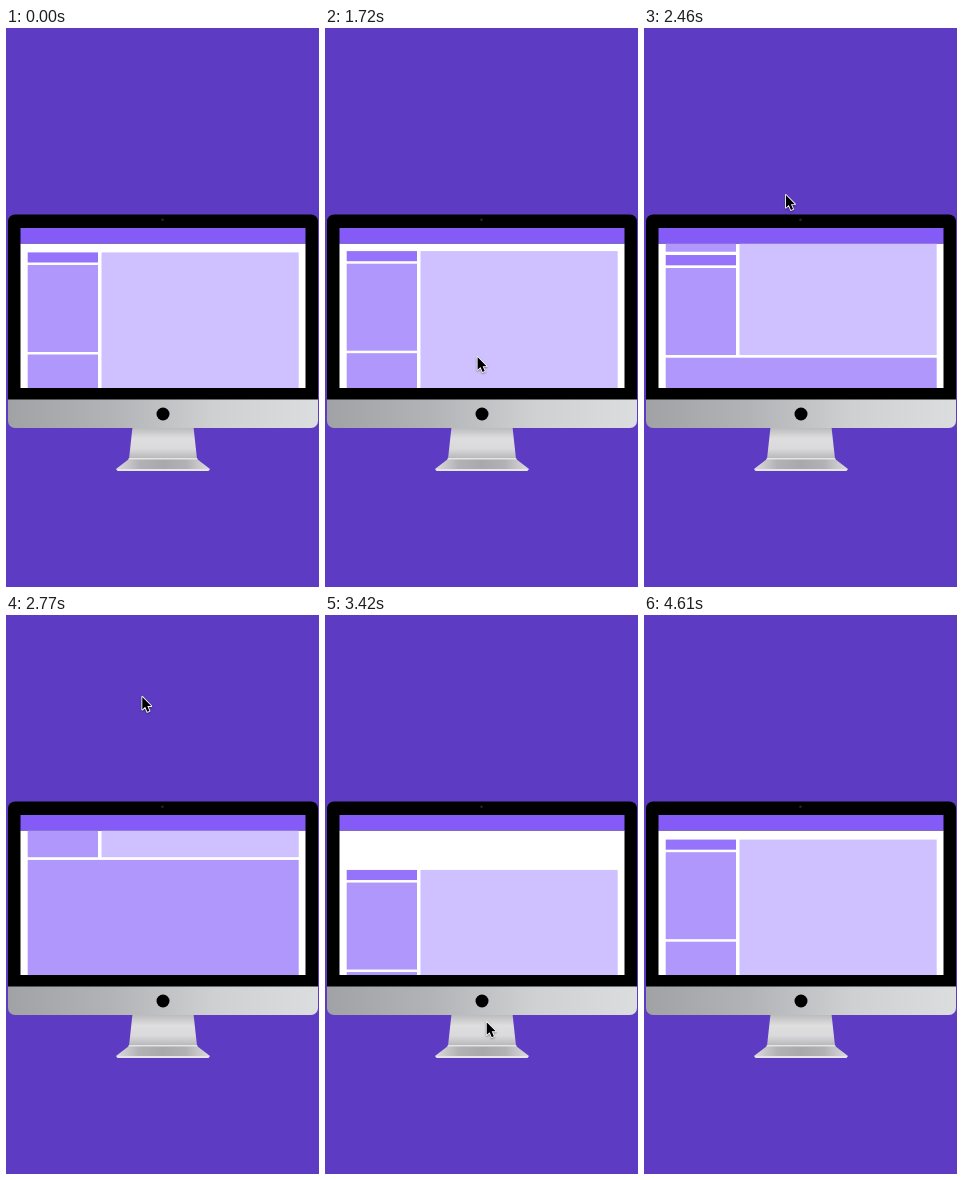
An HTML page with a canvas that plays this animation: 313x559 px, repeating every 4.76 s.

```html
<!DOCTYPE html>
<html lang="en">
<head>
<meta charset="utf-8">
<title>Dragging a page</title>
<style>
  html, body { margin: 0; width: 100%; height: 100%; overflow: hidden; background: #5d3cc3; }
  canvas { display: block; width: 313px; height: 559px; }
</style>
</head>
<body>
<canvas id="stage"></canvas>
<script>
const W = 313, H = 559, LOOP = 4760;
const POINTER_IN = 440, POINTER_OUT = 3850;
const GRAB_Y = 331, RELEASE = 3770;
const LAG = 16;        // ms the page trails the pointer
const STRETCH = 0.43;  // share of the drag followed past the top
const SETTLE = 160;    // time constant of the return, ms

const canvas = document.getElementById('stage');
const ctx = canvas.getContext('2d');
const ratio = window.devicePixelRatio || 1;
canvas.width = Math.round(W * ratio);
canvas.height = Math.round(H * ratio);
ctx.scale(ratio, ratio);

const easeOut = p => Math.sin(p * Math.PI / 2);
const easeInOut = p => (1 - Math.cos(p * Math.PI)) / 2;
const gather = p => p ** 1.23;

// Each stroke starts where the last one ended
const strokes = [
  { from: 440, to: 810, x: 134, y: 331, ease: easeOut },
  { from: 1200, to: 1360, x: 152, y: GRAB_Y, ease: easeInOut },
  { from: 1690, to: 2850, x: 134, y: 58, ease: gather },
  { from: 2870, to: 3540, x: 162, y: 420, ease: easeOut },
  { from: 3540, to: 3850, x: 162, y: 411, ease: easeInOut }
];

function pointerAt(t) {
  let x = 17, y = 364;
  for (const s of strokes) {
    const p = s.ease(Math.min(1, Math.max(0, (t - s.from) / (s.to - s.from))));
    x += (s.x - x) * p;
    y += (s.y - y) * p;
  }
  return { x, y };
}

function scrollAt(t) {
  if (t < strokes[2].from) return 0;
  const drag = pointerAt(Math.min(t, RELEASE) - LAG).y - GRAB_Y;
  const offset = drag > 0 ? drag * STRETCH : drag;
  return offset * Math.exp(-Math.max(0, t - RELEASE) / SETTLE);
}

function box(x0, y0, x1, y1, fill) {
  ctx.fillStyle = fill;
  ctx.fillRect(x0, y0, x1 - x0, y1 - y0);
}

// Symmetric trapezoid around the stand's axis
function trapezoid(y0, half0, y1, half1, fill) {
  const cx = 157;
  ctx.beginPath();
  ctx.moveTo(cx - half0, y0);
  ctx.lineTo(cx + half0, y0);
  ctx.lineTo(cx + half1, y1);
  ctx.lineTo(cx - half1, y1);
  ctx.fillStyle = fill;
  ctx.fill();
}

function disc(x, y, r, fill) {
  ctx.beginPath();
  ctx.arc(x, y, r, 0, Math.PI * 2);
  ctx.fillStyle = fill;
  ctx.fill();
}

// Evenly spaced colour stops
function gradient(x0, y0, x1, y1, ...colors) {
  const g = ctx.createLinearGradient(x0, y0, x1, y1);
  colors.forEach((c, i) => g.addColorStop(i / (colors.length - 1), c));
  return g;
}

function drawStand() {
  trapezoid(399, 30.5, 431, 34, gradient(0, 400, 0, 431, '#bcbcbf', '#dededf', '#dadadc', '#b6b6b8'));
  trapezoid(431, 34, 441, 47, gradient(110, 0, 204, 0, '#dcdcde', '#b2b2b4', '#a9a9ab', '#b2b2b4', '#dcdcde'));
  trapezoid(430, 34, 431.5, 35, '#e4e4e6');
  trapezoid(441, 47, 443, 45.5, '#e6e6e8');
}

function drawCase() {
  ctx.save();
  ctx.beginPath();
  ctx.roundRect(2, 186.5, 310, 213.5, 7);
  ctx.clip();
  box(2, 186, 312, 372, '#000');
  box(2, 371.5, 312, 400, gradient(2, 0, 312, 0, '#a0a2a5', '#b2b3b6', '#cfd0d2', '#dcdddf'));
  ctx.restore();
  disc(156.5, 191.7, 1.3, '#25252b');
  disc(157, 386, 6.5, '#000');
}

function drawPage(offset) {
  const bar = '#9573fb', panel = '#af97fc', body = '#cfc0ff';
  const left = 21.7, split = 92, right = 292.7;
  const block = (x0, y0, x1, y1, fill) => box(x0, y0 + offset, x1, y1 + offset, fill);
  ctx.save();
  ctx.beginPath();
  ctx.rect(14, 215.5, 286, 144.5);
  ctx.clip();
  box(14.5, 215, 299.5, 360, '#fff');
  block(left, 224.4, split, 234.5, bar);
  block(left, 237, split, 324, panel);
  block(left, 326.5, split, 384.7, panel);
  block(left, 388, split, 398.3, bar);
  block(left, 401, split, 488, panel);
  block(95.5, 224.4, right, 488, body);
  block(left, 490.7, right, 640, panel);
  ctx.restore();
  box(14.5, 200, 299.5, 215.5, '#845bf7');
}

function drawPointer({ x, y }) {
  const arrow = new Path2D('M0 0V14.4L3.3 11.3L5.7 17L8.1 16L5.7 10.4H10.2Z');
  ctx.save();
  ctx.translate(x + 0.8, y + 1.2);
  ctx.scale(0.88, 0.88);
  ctx.lineJoin = 'round';
  ctx.lineWidth = 2;
  ctx.strokeStyle = '#fff';
  ctx.shadowColor = 'rgba(0,0,0,.4)';
  ctx.shadowBlur = 2 * ratio;
  ctx.shadowOffsetY = ratio;
  ctx.stroke(arrow);
  ctx.shadowColor = 'transparent';
  ctx.fillStyle = '#000';
  ctx.fill(arrow);
  ctx.restore();
}

function draw(t) {
  box(0, 0, W, H, '#5d3cc3');
  drawStand();
  drawCase();
  drawPage(scrollAt(t));
  if (t >= POINTER_IN && t < POINTER_OUT) drawPointer(pointerAt(t));
}

const start = performance.now();
function tick() {
  draw((performance.now() - start) % LOOP);
  requestAnimationFrame(tick);
}
tick();
</script>
</body>
</html>
```
